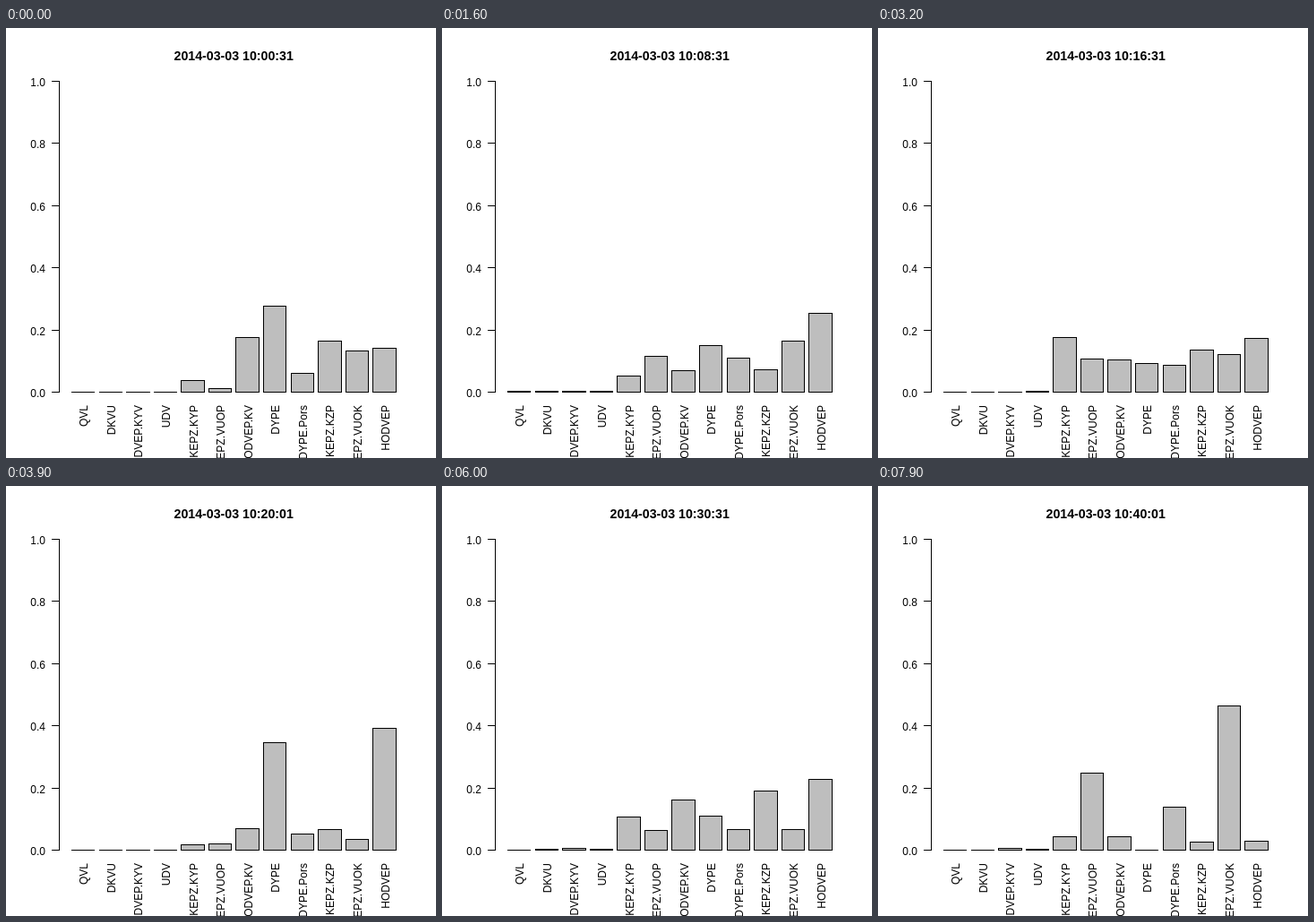
Recreate the animation shown at these times as an HTML page with a canvas. Size 480 by 480 pixels, loop 8 s.

```html
<!DOCTYPE html>
<html lang="en">
<head>
<meta charset="utf-8">
<title>Share by venue</title>
<style>
  html, body { margin: 0; width: 100%; height: 100%; overflow: hidden; background: #fff; }
  canvas { display: block; }
</style>
</head>
<body>
<canvas id="chart" width="480" height="480"></canvas>
<script>
const ctx = document.getElementById('chart').getContext('2d');
const FACE = 'Arial, "Liberation Sans", sans-serif';
const LOOP = 8000, STEP = 100;
const LEFT = 59, BASE = 406, FULL = 347;
const BAR_X = 73.51, BAR_W = 25.477, PITCH = BAR_W * 1.2;
const START = Date.UTC(2014, 2, 3, 10, 0, 31);
const QUIET = 4;   // the first venues hardly trade
const REACH = 9;   // steps over which a surge fades

const venues = ['QVL', 'DKVU', 'HODVEP.KYV', 'UDV', 'KEPZ.KYP', 'KEPZ.VUOP',
  'HODVEP.KV', 'DYPE', 'DYPE.Pors', 'KEPZ.KZP', 'KEPZ.VUOK', 'HODVEP'];

// Venue, step of the peak, share at the peak
const surges = [
  ['DYPE', 0, 0.277],
  ['HODVEP', 16, 0.254],
  ['DYPE', 24, 0.66],
  ['DYPE', 39, 0.346],
  ['HODVEP', 39, 0.392],
  ['HODVEP.KV', 51, 0.669],
  ['KEPZ.KYP', 51, 0.205],
  ['DYPE', 51, 0.126],
  ['HODVEP.KV', 70, 0.211],
  ['KEPZ.VUOK', 70, 0.223],
  ['KEPZ.VUOK', 79, 0.464]
];

function noise(step, bar) {
  const n = Math.sin(step * 12.9898 + bar * 78.233) * 43758.5453;
  return n - Math.floor(n);
}

// Surges take their part; the other venues split the rest at random
function shares(step) {
  const taken = venues.map(() => 0);
  const weight = venues.map((_, i) => noise(step, i) * (i < QUIET ? 0.02 : 1));
  for (const [name, peak, share] of surges) {
    const i = venues.indexOf(name);
    const fade = Math.abs(step - peak) / REACH * (1 + noise(step, i));
    const level = Math.max(0, 1 - fade);
    taken[i] += share * level;
    weight[i] *= 1 - level;
  }
  const sum = list => list.reduce((a, b) => a + b);
  const unit = (1 - sum(taken)) / sum(weight);
  return taken.map((t, i) => t + weight[i] * unit);
}

function line(x0, y0, x1, y1) {
  ctx.beginPath();
  ctx.moveTo(x0 + 0.5, y0 + 0.5);
  ctx.lineTo(x1 + 0.5, y1 + 0.5);
  ctx.stroke();
}

function text(str, x, y, align, font, angle = 0) {
  ctx.save();
  ctx.translate(x, y);
  ctx.rotate(angle);
  ctx.font = `${font} ${FACE}`;
  ctx.textAlign = align;
  ctx.fillStyle = '#000';
  ctx.fillText(str, 0, 0);
  ctx.restore();
}

function draw(step) {
  ctx.fillStyle = '#fff';
  ctx.fillRect(0, 0, 480, 480);
  ctx.strokeStyle = '#000';
  ctx.lineWidth = 1;
  ctx.lineCap = 'square';

  const stamp = new Date(START + step * 30000).toISOString().slice(0, 19).replace('T', ' ');
  text(stamp, 254.2, 36, 'center', 'bold 14.2px');

  line(LEFT, BASE - FULL, LEFT, BASE);
  for (let i = 0; i <= 5; i++) {
    const y = Math.floor(406.56 - i * 69.504);
    line(LEFT - 8, y, LEFT, y);
    text((i / 5).toFixed(1), 44, y + 6, 'right', '12px');
  }

  shares(step).forEach((share, i) => {
    const h = Math.round(share * FULL);
    const left = BAR_X + i * PITCH;
    const x = Math.floor(left), w = Math.floor(left + BAR_W) - x;
    ctx.fillStyle = '#bebebe';
    ctx.fillRect(x + 0.5, BASE - h + 0.5, w, h);
    if (h) ctx.strokeRect(x + 0.5, BASE - h + 0.5, w, h);
    else line(x, BASE, x + w, BASE);
    text(venues[i], Math.round(left + BAR_W / 2) + 5, 421, 'right', '12px', -Math.PI / 2);
  });
}

function tick() {
  draw(Math.floor(performance.now() % LOOP / STEP));
  requestAnimationFrame(tick);
}
tick();
</script>
</body>
</html>
```
